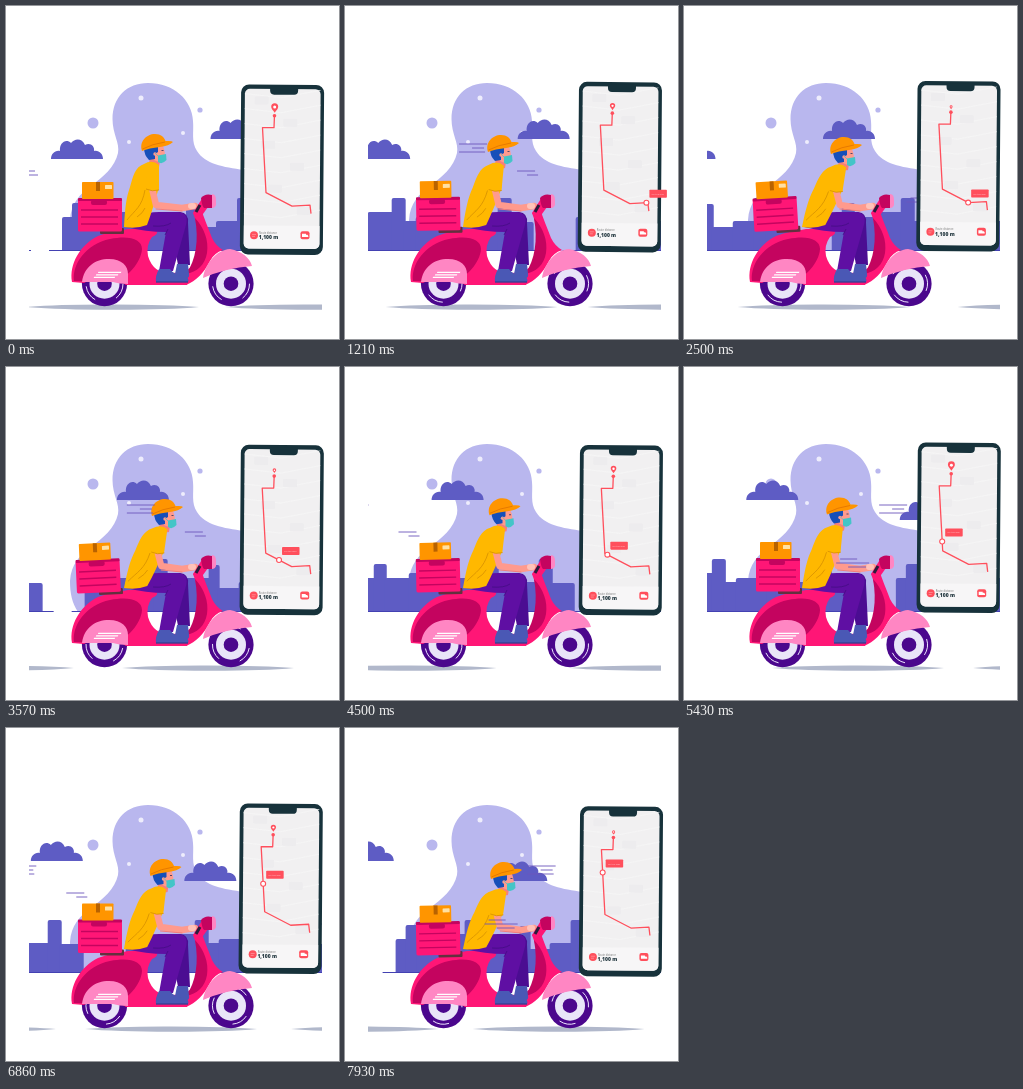
An HTML page with a canvas for the animation above (8000 ms loop, 333 by 333 pixels).

```html
<!DOCTYPE html>
<html lang="en">
<head>
<meta charset="utf-8">
<title>Delivery scooter</title>
<style>
html, body { margin: 0; width: 100%; height: 100%; overflow: hidden; background: #fff; }
canvas { display: block; width: 100vw; height: 100vh; }
</style>
</head>
<body>
<canvas id="stage"></canvas>
<script>
const SIZE = 333, LOOP = 8000, FPS = 14;
const canvas = document.getElementById('stage');
const c = canvas.getContext('2d');
const C = {
  blob: '#b9b7ee', city: '#5e5cc4', pink: '#ff1676', crimson: '#c4045f', rose: '#ff86c3',
  purple: '#4b078d', pants: '#5f0fa3', shirt: '#ffb800', orange: '#ff9500', skin: '#ff9a8d',
  shoe: '#4a58b5', frame: '#17323b', route: '#ff4f5c', lilac: '#e9e5f8', road: '#b1b8cb'
};

const mod = (a, n) => ((a % n) + n) % n;

function fill(d, color) {
  c.fillStyle = color;
  c.fill(new Path2D(d));
}
function line(d, color, width = 1) {
  c.strokeStyle = color;
  c.lineWidth = width;
  c.stroke(new Path2D(d));
}
function dot(x, y, r, color) {
  c.fillStyle = color;
  c.beginPath();
  c.arc(x, y, r, 0, 7);
  c.fill();
}
function box(x, y, w, h, r, color) {
  c.fillStyle = color;
  c.beginPath();
  c.roundRect(x, y, w, h, r);
  c.fill();
}
function group(draw) {
  c.save();
  draw();
  c.restore();
}
function clipped(x, y, w, h, draw) {
  group(() => {
    c.beginPath();
    c.rect(x, y, w, h);
    c.clip();
    draw();
  });
}
function turn(x, y, angle) {
  c.translate(x, y);
  c.rotate(angle);
  c.translate(-x, -y);
}

// Smooth value through poses at shared times (seconds)
const POSES = [0, 1.21, 2.5, 3.57, 5.43, 6.86, 8];
function pose(t, v) {
  let i = 0;
  while (i < POSES.length - 2 && t > POSES[i + 1]) i++;
  const u = Math.min(1, (t - POSES[i]) / (POSES[i + 1] - POSES[i]));
  return v[i] + (v[i + 1] - v[i]) * u * u * (3 - 2 * u);
}

function backdrop() {
  fill('M72 245C66 236 64 226 64 214C65 197 74 188 85 180C97 171 109 161 112 147C114 137 106.5 128 106.5 113C106.5 91 121 77 142 77C168 77 186 94 187 115C188 126 185 136 191 145C199 158 217 161 238 164C268 168 290 190 290 245Z', C.blob);
  dot(87, 117, 5.5, C.blob);
  dot(194, 104, 2.6, C.blob);
  dot(135, 92, 2.5, '#eeedfc');
  dot(177, 127, 2, '#eeedfc');
  dot(123, 136, 2, '#eeedfc');
}

function cloud(x, y) {
  group(() => {
    c.translate(x, y);
    fill('M-26 0C-26 -5 -22 -9 -17 -8C-18 -16 -11 -21 -6 -16C-2 -21 5 -21 8 -14C13 -17 18 -13 17 -8C22 -9 26 -5 26 0Z', C.city);
  });
}

// Offset, width and top of each block in one stretch of skyline
const HOUSES = [[0, 12, 211], [10, 13, 197], [21, 26, 211], [45, 26, 206], [69, 14, 192], [81, 14, 215],
  [93, 33, 211], [124, 11, 198], [133, 23, 221], [154, 23, 215], [175, 14, 192], [187, 24, 216]];

function city(t) {
  const x0 = 56 - mod(64.5 * t, 253);
  for (const x of [x0 - 253, x0, x0 + 253]) {
    for (const [dx, w, top] of HOUSES) box(x + dx, top, w, 245 - top, [2, 2, 0, 0], C.city);
    line(`M${x - 13} 244.5H${x + 222}`, '#4341b2');
  }
}

const ROADS = [21, 219, 421, 641, 886, 1087, 1293];

function scenery(t) {
  clipped(23, 60, 293, 250, () => {
    const drift = 26.2 * t;
    cloud(71 - drift, 153);
    cloud(230.5 - drift, 133);
    cloud(384 - drift, 153);
    city(t);
    for (const start of ROADS) {
      const x = start - 147 * t;
      fill(`M${x} 301Q${x + 30} 298.3 ${x + 86} 298.5T${x + 172} 301Q${x + 142} 303.8 ${x + 86} 303.7T${x} 301Z`, C.road);
    }
  });
}

const STREAKS = [[0, 138, 28], [13, 142, 12], [0, 146, 26], [58, 165, 18], [68, 169, 11],
  [-39, 192, 17], [-43, 196, 33], [-31, 200, 18]];

function streaks(t) {
  clipped(23, 60, 293, 250, () => {
    const x0 = 278 - mod(135 * t, 325);
    for (const x of [x0 - 325, x0, x0 + 325])
      for (const [dx, y, w] of STREAKS) line(`M${x + dx} ${y}h${w}`, '#6c55bb', 0.9);
  });
}

function wheel(x, t) {
  const y = 277.7;
  dot(x, y, 22.6, C.purple);
  dot(x, y, 15, C.lilac);
  dot(x, y, 7.3, C.purple);
  c.strokeStyle = '#eee7ff';
  c.lineWidth = 1;
  for (let i = 0; i < 3; i++) {
    const a = t * 6.5 + i * 2.1;
    c.beginPath();
    c.arc(x, y, 18.5, a, a + 0.9);
    c.stroke();
  }
}

function boxes(t) {
  group(() => {
    c.translate(pose(t, [0, -0.5, -1.5, -1, 0, 0, -0.5]), pose(t, [0, -1, -1, 0, -1, -0.5, 1.5]));
    turn(96, 226, pose(t, [0, -0.015, -0.06, -0.045, 0, 0, -0.02]));
    box(94, 222, 24, 6, 1, '#63303f');
    box(72, 193, 44, 32.5, 1.5, C.pink);
    box(72, 192, 44, 3, 1, C.crimson);
    box(85, 194, 16, 5, 2, C.crimson);
    for (const y of [204, 211, 218]) line(`M75 ${y}H112`, C.crimson, 1.4);
    box(76, 176, 31.5, 17, 0.8, C.orange);
    box(90, 176, 4, 9, 0, '#b86200');
    box(99, 179, 7, 4, 0.5, '#ffe0a3');
  });
}

function scooter(t) {
  wheel(98.5, t);
  wheel(225, t);
  // Leg shield, its inner face and the floor
  fill('M187 207L195 202C198 213 202 221 206 232Q210 240 217 244Q208 247 204 255C198 267 190 275 180 279H120V267H165C178 267 186 263 190 254C195 240 193 222 187 207Z', C.pink);
  fill('M189 212C198 222 203 234 201 247C199 259 191 266 180 268C190 254 193 234 189 212Z', C.crimson);
  fill('M197 272C199 258 210 244 224 243C236 245 244 252 246 260Q220 262 197 272Z', C.rose);
  // Rear body
  fill('M66 276C63 258 74 239 92 230C102 226 112 225 122 223H151Q153 228 146 231Q140 239 142 250Q147 267 165 268H185L181 279H120C103 268 89 271 78 277Z', C.pink);
  fill('M68 275C66 258 80 238 104 233C123 229 136 233 136 243C135 257 121 272 108 276Z', C.crimson);
  fill('M76 276C78 261 89 253 103 253C116 253 122 260 122 268V278C116 278 111 277 107 276Z', C.rose);
  group(() => {
    c.transform(1, 0, -0.45, 1, 123, 0);
    for (let i = 0; i < 3; i++) line(`M${89 - i} ${266.3 + i * 2.5}h${23 - i}`, '#fff', 1.3);
  });
}

function legs() {
  fill('M160 206H174Q183 207 182 217L184 259H172L166 226Z', '#4b0d92');
  fill('M120 221C126 211 138 206 153 206H172Q183 207 180 219L167 265H153L160 226Q140 226 120 221Z', C.pants);
  line('M147 220Q159 221 165 217M159 229L162 223', '#430d83', 0.8);
  fill('M171 258H182L183 268Q184 272 179 273L169 268Z', C.shoe);
  fill('M153 263H164Q168 269 178 270Q184 272 182 276H150Q149 270 153 263Z', C.shoe);
  line('M150 276H182', '#333d91', 1.3);
}

function head() {
  fill('M144 150L155 149L153 161Q148 162 143 158Z', '#f77f78');
  fill('M143 140H157Q160 147 158 153Q155 158 148 154Z', C.skin);
  fill('M138 142L152 139L152 146L149 148V153L143 154Q138 149 138 142Z', '#164fb9');
  dot(149, 148, 1.7, C.skin);
  fill('M152 149.5L160 148L160.5 154Q156 159 152 156Z', '#43c5c7');
  line('M149 147L153 151', '#43c5c7', 0.7);
  line('M155.5 144.5h2', '#263060', 0.8);
  fill('M136 145C133 136 140 128 149 128C155 128 158 131 159.5 135Q166 134.5 167 136Q163 140 154 141Q143 142 136 145Z', C.orange);
  line('M136.5 143Q146 138 159 136', '#e47700', 0.9);
}

function rider(t) {
  const lean = pose(t, [0, 7, 11, 10, 7, 8.5, 10]);
  const drop = pose(t, [0, 1, 3, 4, 2.5, 3, 6]);
  legs();
  group(() => {
    c.translate(lean, drop);
    head();
  });
  // Hips stay put while the shoulders lean
  const skew = lean / 74;
  group(() => {
    c.transform(1, 0, -skew, 1 - drop / 75, 221 * skew, drop * 221 / 75);
    fill('M138 158Q146 153 153 159L153 181Q147 203 141 219Q131 223 118 221C119 203 120 192 124 181C127 170 129 161 138 158Z', C.shirt);
    line('M139 184C136 201 129 204 121 214M131 211Q137 207 139 202', '#d69000', 0.8);
  });
  const sx = 146 + skew * 39, sy = 182 + drop * 0.5;
  c.lineJoin = c.lineCap = 'round';
  line(`M${sx} ${sy}L${sx + 4} 199L176 202L189 200`, C.skin, 6.5);
  line(`M${sx + 4} 203L176 205`, '#f47e79', 1);
  c.lineCap = 'butt';
  fill(`M${sx - 5} ${sy - 17}Q${sx + 3} ${sy - 23} ${sx + 6} ${sy - 16}L${sx + 7} ${sy + 2}Q${sx} ${sy + 4} ${sx - 7} ${sy + 1}Z`, C.shirt);
  line(`M${sx - 6} ${sy + 1}Q${sx} ${sy + 4} ${sx + 7} ${sy + 2}`, '#d69000', 0.8);
}

function handlebar() {
  fill('M187 207L197 191L202 201L197 208L190 211Z', C.pink);
  fill('M195 192Q199 187 206 189V202H198Q196 200 195 192Z', C.crimson);
  fill('M206 188Q210 188 210 194V199Q209 202 206 202Z', C.rose);
  line('M190 206L194 199', '#291d3b', 3);
  box(182, 197, 8, 6, 3, '#ffc2b8');
}

const ROUTE = [[305, 208], [304, 199.5], [286, 200.5], [260, 187], [256.5, 122], [268, 122], [268.5, 109]];

function along(dist) {
  for (let i = 1; i < ROUTE.length; i++) {
    const [x, y] = ROUTE[i - 1], [p, q] = ROUTE[i];
    const len = Math.hypot(p - x, q - y);
    if (dist <= len) return [x + (p - x) * dist / len, y + (q - y) * dist / len];
    dist -= len;
  }
  return ROUTE[ROUTE.length - 1];
}

function text(s, x, y, font, color) {
  c.font = font + ' "Open Sans", sans-serif';
  c.fillStyle = color;
  c.fillText(s, x, y);
}

function screenMap() {
  box(238.3, 83.3, 75.7, 159.7, 5, '#f1f0f1');
  clipped(238.3, 84, 75.7, 136, () => {
    for (let i = 0; i < 9; i++) {
      const y = 88 + i * 15;
      line(`M236 ${y}L275 ${y + 4}L315 ${y - 4}`, '#f7f7f7', 0.8);
    }
    for (let i = 0; i < 6; i++) box(248 + (i * 29) % 51, 91 + i * 22, 14, 8, 1, '#edecee');
  });
  box(238.3, 220, 75.7, 23, [0, 0, 5, 5], '#f7f6f7');
  box(263.5, 81, 28, 8, [0, 0, 4, 4], C.frame);
}

function marker(t) {
  const grow = Math.min(1, Math.max(0, (t - 0.45) / 0.3));
  if (!grow) return;
  const [x, y] = along(13.1 * (t - 0.45));
  group(() => {
    c.translate(x, y);
    c.scale(grow, grow);
    dot(0, 0, 3, C.route);
    dot(0, 0, 1.9, '#fff');
    box(3, -13, 17.5, 8, 0.8, C.route);
    text('On the way', 5, -8, '2.4px', '#ffc9cd');
  });
}

function pin(t) {
  const s = 0.7 + 0.3 * Math.cos(t * 2 * Math.PI / 5.6);
  dot(268.5, 110, 1.8, C.route);
  group(() => {
    c.translate(268.7, 107);
    c.scale(s, s);
    fill('M0 0C-2 -3 -3.5 -4 -3.5 -6A3.5 3.5 0 0 1 3.5 -6C3.5 -4 2 -3 0 0Z', C.route);
    dot(0, -5.7, 1.5, '#fff');
  });
}

function summary() {
  dot(248, 229.5, 4, C.route);
  line('M246 228.7h4M246 230.7h3', '#ff9ca2', 0.7);
  text('Route distance', 253, 228.3, '2.6px', '#777');
  text('1,100 m', 252.7, 233.4, '800 5px', '#263a42');
  box(294.5, 225.5, 9, 8, 2, C.route);
  fill('M296 228H300V229H301.5L302.3 230.3V231.3H296Z', '#fff');
}

function phone(t) {
  const sway = Math.cos(t * 2 * Math.PI / 4.1);
  group(() => {
    c.translate(-0.9 + sway * 0.9, -2.3 + sway * 2);
    group(() => {
      turn(276, 164, 0.008);
      box(234.5, 79, 83, 170, 8, C.frame);
      screenMap();
    });
    c.lineJoin = 'round';
    line('M' + ROUTE.map(p => p.join(' ')).join('L'), C.route, 1.3);
    pin(t);
    summary();
    marker(t);
  });
}

function draw(ms) {
  // Small lead so times rounded to 10 ms land on the right step
  const t = Math.floor((mod(ms, LOOP) + 5) * FPS / 1000) / FPS;
  const ratio = devicePixelRatio || 1;
  const w = Math.round(innerWidth * ratio), h = Math.round(innerHeight * ratio);
  if (canvas.width !== w || canvas.height !== h) {
    canvas.width = w;
    canvas.height = h;
  }
  c.setTransform(w / SIZE, 0, 0, h / SIZE, 0, 0);
  c.fillStyle = '#fff';
  c.fillRect(0, 0, SIZE, SIZE);
  backdrop();
  scenery(t);
  scooter(t);
  rider(t);
  handlebar();
  streaks(t);
  boxes(t);
  phone(t);
}

const start = performance.now();
function tick() {
  draw(performance.now() - start);
  requestAnimationFrame(tick);
}
tick();
</script>
</body>
</html>
```
